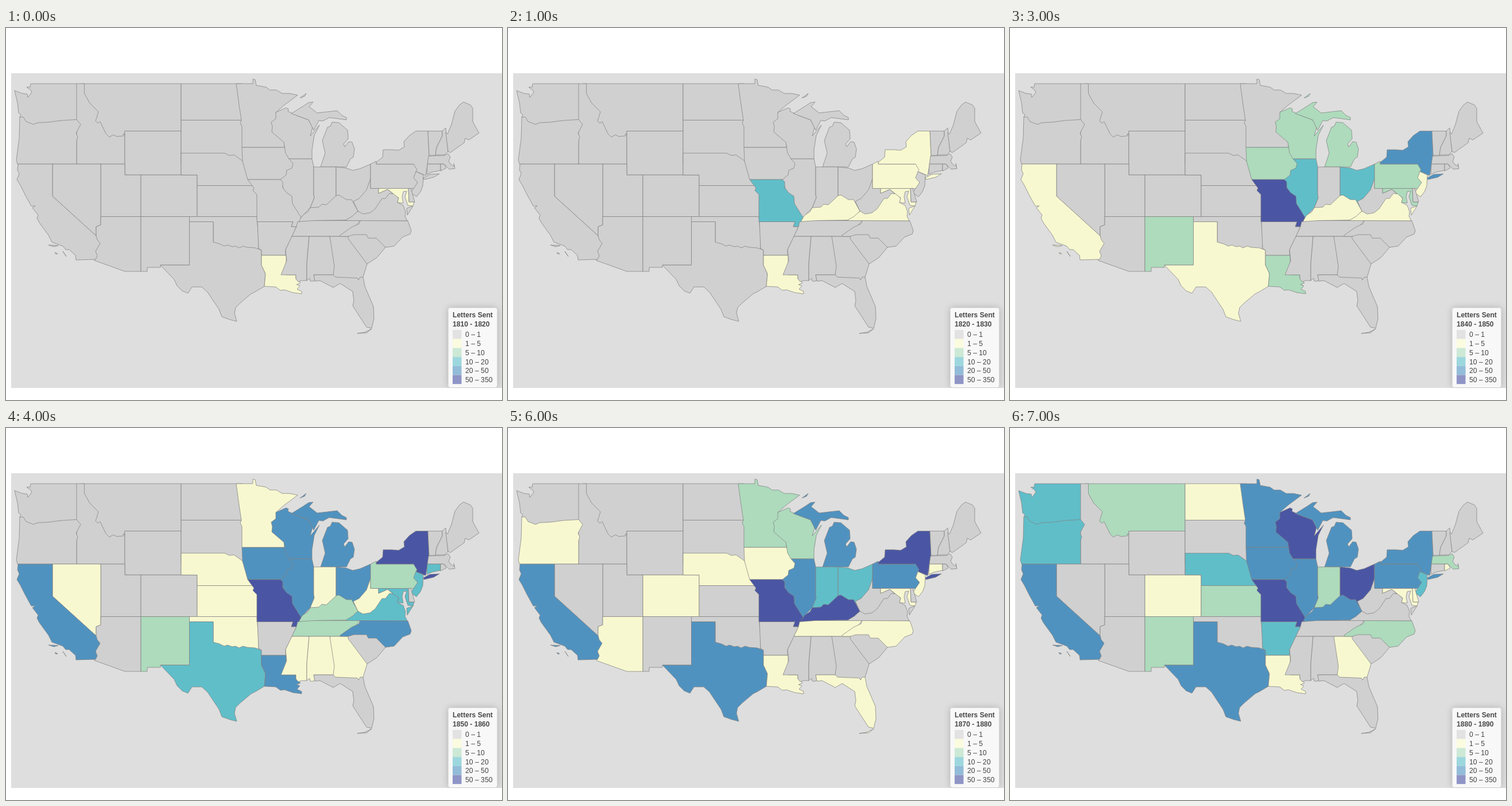
An HTML page for the animation above (8 s loop, 864 by 648 pixels).

```html
<!DOCTYPE html>
<html lang="en">
<head>
<meta charset="utf-8">
<title>Letters Sent</title>
<style>
html, body { margin: 0; width: 100%; height: 100%; overflow: hidden; background: #fff; }
svg { display: block; width: 864px; height: 648px; }
#map { fill: #d0d0d0; stroke: #808080; stroke-width: .75; stroke-linejoin: round; }
text { font: 12.2px "Liberation Sans", Arial, sans-serif; fill: #444; }
.head { font-weight: bold; font-size: 12.1px; fill: #484848; }
.box { fill: #f8f8f8; filter: drop-shadow(0 0 6px rgba(0,0,0,.22)); }
</style>
</head>
<body>
<svg viewBox="0 0 864 648">
  <clipPath id="frame"><path d="M9 78.5H864V627H9z"/></clipPath>
  <g clip-path="url(#frame)">
    <path fill="#dedede" d="M9 78.5H864V627H9z"/>
    <!-- Later states cover the loose edges of earlier ones; data-levels has one digit per decade. -->
    <g id="map">
      <path id="WA" data-levels="00000003" d="M43,97H124V170H30L24,155 26,151 22,148 20,130 15,109 28,114 37,115 38,121 45,112 43,108 36,103 42,103z"/>
      <path id="MT" data-levels="00000002" d="M130,97H305V179.5H207V195H140z"/>
      <path id="ID" d="M123,97H136.5V114L146,131 161,146 156,162 160,166 164,163 174,184 180,190 187,186 193,189 204,188 205,184 207,188V237H123z"/>
      <path id="OR" data-levels="00000213" d="M24,155 30,155 35,163 48,168 55,165 74,164 97,161 123,159.5 130,168 122,183 125,190 123,196V237H20L18,230 23,192z"/>
      <path id="WY" d="M207,179.5H305V256H207z"/>
      <path id="UT" d="M165,237H207V256H235V328.5H165z"/>
      <path id="NV" data-levels="00001000" d="M81,237H165V343L157,346V362L81,293z"/>
      <path id="AZ" data-levels="00000010" d="M165,328.5H235V424H207L154,405 150,385 157,362V346L165,343z"/>
      <path id="CA" data-levels="00014544" d="M21,237H81V293L157,362 159,369 164,375 156,389 159,397 156,403 122,404 121,396 110,386 104,386 99,380 80,373 74,361 58,339 54,331 56,326 46,313 51,310 44,310 33,290 25,274 19,264 23,254 20,247zM74,378 91,379 83,381zM85,391 90,393 87,394zM99,389 105,398z"/>
      <path id="CO" data-levels="00000011" d="M235,256H333V328.5H235z"/>
      <path id="NM" data-levels="00122102" d="M235,328.5H319.5V413H269V417H246V424H235z"/>
      <path id="ND" data-levels="00000001" d="M305,97H412V160.5H305z"/>
      <path id="SD" d="M305,160.5H413V235H305z"/>
      <path id="NE" data-levels="00001113" d="M305,218H381L389,222 397,221 410,230 430,250V274.5H333V256H305z"/>
      <path id="KS" data-levels="00001102" d="M333,274.5H440V328.5H333z"/>
      <path id="OK" data-levels="00001100" d="M319.5,328.5H437L440,365V390H361V337.5H319.5z"/>
      <path id="TX" data-levels="00013444" d="M319.5,337.5H361V373L372,376 380,380 386,378 394,381 400,380 406,383 413,380 420,382 434,383 445,387V413L452,428 450,450 435,459 427,463 408,479 400,487 398,497 402,511 390,508 376,503 371,490 351,460 341,451 324,451 317,462 307,458 298,449 293,438 269,413H319.5z"/>
      <path id="MN" data-levels="00001224" d="M401,97H430V89L434,90 436,100 453,103 460,108 471,108 481,114 494,114 508,117 485,134 470,147 485,170V208H411V171L408,166 410,160.5 406,134z"/>
      <path id="IA" data-levels="00024314" d="M411,208H487L505,232 495,264H421L412,232z"/>
      <path id="WI" data-levels="00024425" d="M470,147 488,139 492,141 491,145 508,153 527,160 534,173 530,188 546,169 537,187 533,212V228H493L487,218 484,199 463,181 464,172 462,164 470,158z"/>
      <path id="MI" data-levels="00124444" d="M548,242H593L597,234 600,228 605,225 607,211 603,199 597,198 590,207 588,202 596,193 595,178 580,165 568,164 565,171 560,173 551,196 556,218zM497,149 518,136 527,130 535,129 528,137 542,148 577,144 585,152 593,156V160L563,156 552,162 545,161 536,178 527,160 508,153zM512,122 523,114 520,119z"/>
      <path id="IL" data-levels="00134544" d="M493,228H533L536,242V290L537,296 530,313 512,332 500,330 478,264 488,256 489,248 498,244 500,236z"/>
      <path id="IN" data-levels="00001332" d="M536,242H575V292L565,320 530,313 537,296 536,290z"/>
      <path id="OH" data-levels="00334435" d="M575,242 593,244 604,248 617,245 635,237V290L610,310 575,300z"/>
      <path id="VA" data-levels="01013400" d="M592,334.5 640,300 672,284 684,297 682,304 692,309 696,320 695,328 699,336H592zM709,310 699,326 698,314z"/>
      <path id="KY" data-levels="01012154" d="M508,338 517,326 526,320 530,313 545,312 550,307 558,308 575,292 580,291 593,299 602,299 613,319 603,328 592,334.5 535,335.5V337z"/>
      <path id="WV" data-levels="00101200" d="M635,262V279.5H649V288L665,281 674,289 668,288 661,297 655,297 643,315 634,322 622,324 613,319 605,302 615,297 628,282z"/>
      <path id="AR" data-levels="00000103" d="M438,337.5H500L497,346H506L496,368 487,386V396H445V387L440,384z"/>
      <path id="MO" data-levels="03455555" d="M421,264H478L482,268V278L489,287 498,293 499,306 514,330 506,346H497L500,337.5H437V290L430,283 432,279z"/>
      <path id="LA" data-levels="11024411" d="M445,396H488V430H505V437L513,444 506,447 512,449 507,455 515,459V463L500,461 485,456 478,457 470,451 450,450 452,428 445,413z"/>
      <path id="TN" data-levels="00002510" d="M508,337.5 535,335.5H617L600,355 582,363H498L506,346z"/>
      <path id="MS" data-levels="00001400" d="M498,363H528L524,410V440H515L509,442 505,437V430H479L489,405 487,386z"/>
      <path id="AL" data-levels="00001400" d="M528,363H564L575,400V430H536L538,437 536,441H530L529,436 524,440V410z"/>
      <path id="GA" data-levels="00001401" d="M564,363H600L620,380 629,411 622,434 614,439H575L570,430 572,415z"/>
      <path id="FL" data-levels="00000310" d="M536,430H570L574,434 612,435.5 614,439 617,434H622L625,450 640,485 641,506 637,523 628,521 604,484 606,475 604,459 582,445 570,452 547,440 538,441zM612,532 625,530 637,524 628,531z"/>
      <path id="NC" data-levels="00004212" d="M617,335.5 700,336 706,353 704,359 691,364 676,380 661,382 630,375 596,363H582V361L602,347 615,341z"/>
      <path id="SC" data-levels="00100200" d="M596,363 606,360H628L631,366H645L661,382 646,400 629,411 596,367z"/>
      <path id="PA" data-levels="01222344" d="M635,237 645,232V237H717V279.5H635z"/>
      <path id="NY" data-levels="01345554" d="M645,237V234L656,225 657,212H672L684,213 694,207 693,198 703,187 714,179.5H735L737,222 731,257 714,250 716,247 710,237zM727,261 738,255 755,254 745,260 728,264z"/>
      <path id="NJ" data-levels="00113313" d="M714,250 727,256 726,275 722,285 715,294 705,287 717,269 710,261z"/>
      <path id="MD" data-levels="11323311" d="M649,279.5H701L702,303H711L709,310 700,309 695,294 698,284 692,285 690,294 692,305 682,304 684,296 665,281 649,288z"/>
      <path id="DE" data-levels="00000001" d="M701,279.5 705,279 712,303H702z"/>
      <path id="VT" d="M735,179.5H760V188L750,208 748,222H737z"/>
      <path id="NH" d="M760,179.5 766,174 770,215 764,221H748L750,208 760,188z"/>
      <path id="ME" d="M766,182 769,185 776,168 782,145 790,134 797,129 809,134 813,140V163L824,183 806,195 800,192 798,200 774,217 770,215z"/>
      <path id="MA" data-levels="00000102" d="M736,223 764,222 770,219 774,225 771,232 775,238 781,241 780,236 782,245 772,246 763,237H734z"/>
      <path id="CT" data-levels="00003110" d="M734,237H757V248L742,251 733,255z"/>
      <path id="RI" data-levels="00000001" d="M757,237H763L767,244 757,249z"/>
    </g>
    <rect class="box" x="770.5" y="487.5" width="85" height="138.5" rx="4"/>
  </g>
  <g id="legend">
    <text class="head" x="778" y="504">Letters Sent</text>
    <text class="head" x="778" y="520" id="years"></text>
  </g>
</svg>
<script>
const STEP = 1000, STEPS = 8, FIRST_YEAR = 1810;
const COLORS = ['#d0d0d0', '#f8f8d0', '#addbbc', '#60bec9', '#5092bf', '#4a56a3'];
const SWATCHES = ['#e2e2e2', '#fbfbe0', '#cce9d6', '#9dd7de', '#92bcd8', '#8f95c6'];
const RANGES = ['0 – 1', '1 – 5', '5 – 10', '10 – 20', '20 – 50', '50 – 350'];

const states = document.querySelectorAll('[data-levels]');
const legend = document.getElementById('legend');
const years = document.getElementById('years');

function add(tag, attrs, text = '') {
  const node = document.createElementNS('http://www.w3.org/2000/svg', tag);
  for (const key in attrs) node.setAttribute(key, attrs[key]);
  node.textContent = text;
  legend.append(node);
}

RANGES.forEach((range, i) => {
  const y = 526 + i * 15.7;
  add('rect', { x: 778, y, width: 15.5, height: 15.7, fill: SWATCHES[i] });
  add('text', { x: 800, y: y + 12.4 }, range);
});

let shown = -1;
function draw() {
  const step = Math.floor((performance.now() - start) / STEP) % STEPS;
  if (step !== shown) {
    shown = step;
    const from = FIRST_YEAR + step * 10;
    years.textContent = `${from} - ${from + 10}`;
    for (const state of states) state.setAttribute('fill', COLORS[state.dataset.levels[step]]);
  }
  requestAnimationFrame(draw);
}
const start = performance.now();
draw();
</script>
</body>
</html>
```
